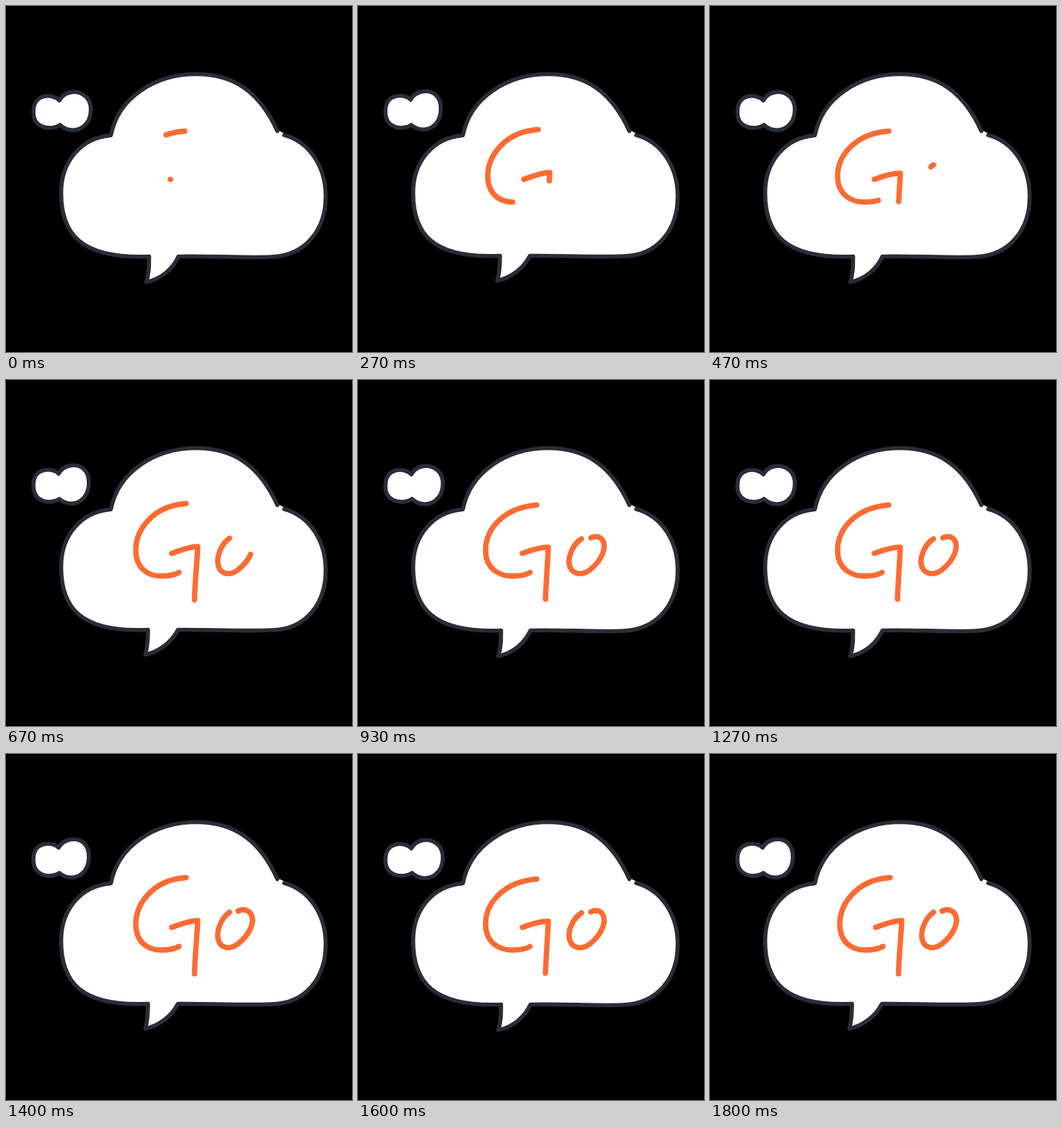
An HTML page that plays this animation: 480 by 480 pixels, repeating every 1.99 s.

```html
<!DOCTYPE html>
<html lang="en">
<head>
<meta charset="utf-8">
<title>Go bubble</title>
<style>
  html, body { margin: 0; width: 100%; height: 100%; overflow: hidden; background: #000; }
  svg { display: block; width: 100vw; height: 100vh; }
  path { stroke-linecap: round; stroke-linejoin: round; }
  .ink { fill: #fff; stroke: #2a2c37; stroke-width: 5.6; }
  .gap { stroke: #fff; stroke-width: 5; }
  .pen { fill: none; stroke: #fd6b33; stroke-width: 7.4; }
</style>
</head>
<body>
<svg viewBox="0 0 480 480">
  <path class="gap" d="M377 175L385 179"/>
  <path class="ink" id="bubble"/>
  <path class="ink" id="puff"/>
  <path class="pen" id="g" pathLength="1"/>
  <path class="pen" id="hook" pathLength="1"/>
  <path class="pen" id="o" pathLength="1"/>
</svg>
<script>
const LOOP = 1990, FRAME = 200 / 3, HOLD = 3;

// The bubble stays put; only its lower edge and tail wobble.
const bubble = (dx, dy) => `M386 179C422 189 443.500 224 443.500 264
  C443.500 310 416 346.500 368 ${347 + dy / 2}C330 ${349 + dy / 2} 280 346 ${238.5 + dx / 2} ${346.5 + dy / 2}
  C${230 + dx} ${363 + dy} ${213 + dx} ${377 + dy} ${193 + dx} ${381 + dy}
  C${197 + dx} ${370 + dy} ${197 + dx} ${358 + dy} ${197 + dx} ${346.5 + dy / 2}
  C102 351 76.500 315 76.500 259C76.500 217 103 183 145.500 179.500
  C156 126 208 94.500 264 94.500C319 94.500 353 122 376.500 173.500`;

// Each shape has two hand-drawn poses that alternate.
const poses = {
  bubble: [bubble(1.5, 2), bubble(0, 0)],
  puff: [
    'M74 131C66 122 38 119.500 38 147C38 172 65 172 75 165C83 173 97 175 107 167.500C121 157 121 132 108.500 124C98 116 81 118 74 131Z',
    'M73 130C66 122 38 119.500 38 146C38 172 64 172 74 165C82 172 95 174 104 167C118 157 118 132 107.500 123C98 115 80 117 73 130Z'
  ],
  g: [
    'M248 173.500C202 177 177 207 177 236C177 262 196 272 214 272C227 272 234 270 238.500 267',
    'M250 171.500C205 174 180 207 180 236C180 262 198 272 215 272C228 272 235 270 240 267'
  ],
  hook: [
    'M228 240.500C240 236 252 232 264 232C263 255 261 280 260 304',
    'M230 240.500C242 236 254 231.500 266 231C265 255 262 280 261.500 305'
  ],
  o: [
    'M310 220.500C298 228 291.500 245 293 255C295 269 309 272.500 321 264C333 255 344 239 341 226C338 217 330 215.500 323 219',
    'M310 219.500C298 228 292.500 245 294 255C296 269 309 272.500 321 264C333 255 344.500 239 341.500 226C338.500 216 329 214 322 218'
  ]
};

// Drawn share of each stroke, one value per step; the last value holds.
const drawn = {
  g: [.14, .36, .56, .72, .86, .86, .97, .97, 1],
  hook: [.001, .1, .2, .32, .44, .44, .7, .7, .92, 1],
  o: [0, 0, 0, 0, 0, 0, .03, .03, .34, .55, .72, .72, .86, .95, 1]
};

const byId = id => document.getElementById(id);

function draw(time) {
  const step = Math.floor((time % LOOP + 4) / FRAME);
  const pose = Math.floor(step / HOLD) % 2;
  for (const id in poses) byId(id).setAttribute('d', poses[id][pose]);
  for (const id in drawn) {
    const share = drawn[id][Math.min(step, drawn[id].length - 1)];
    const { style } = byId(id);
    style.visibility = share ? 'visible' : 'hidden';
    style.strokeDasharray = share < 1 ? `${share} 2` : 'none';
  }
}

function tick() {
  draw(performance.now());
  requestAnimationFrame(tick);
}
tick();
</script>
</body>
</html>
```
